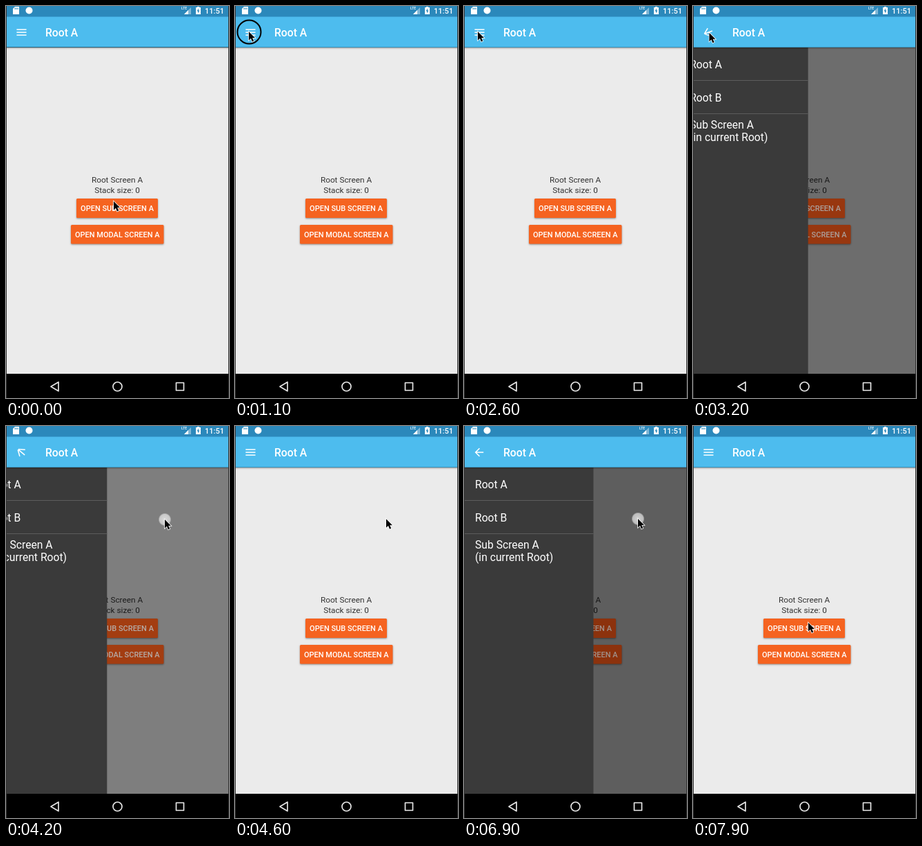
Recreate the animation shown at these times as an HTML page with a canvas. Size 323 px wide and 566 px high, loop 8 s.

```html
<!DOCTYPE html>
<html lang="en">
<head>
<meta charset="utf-8">
<title>Navigation drawer</title>
<style>
  html, body { margin: 0; height: 100%; overflow: hidden; background: #000; }
  canvas { display: block; }
</style>
</head>
<body>
<canvas id="stage" width="323" height="566"></canvas>
<script>
const ctx = document.getElementById('stage').getContext('2d');
const W = 323, H = 566, LOOP = 8000, STEP = 100;
const DRAWER = 187.5, TOP = 60, NAV = 531, DP = 0.786;

const clamp = x => Math.max(0, Math.min(1, x));
const lerp = (a, b, k) => a + (b - a) * k;
const smooth = k => k * k * (3 - 2 * k);
const easeOut = k => 1 - (1 - k) * (1 - k);
const mix = (a, b, k) => `rgb(${a.map((v, i) => Math.round(lerp(v, b[i], k)))})`;

// Cursor waypoints: time, x, y
const route = [
  [200, 156, 282], [900, 20, 37], [3150, 20, 37], [3800, 230, 135],
  [4500, 230, 135], [5250, 3, 121], [5450, 3, 121], [5650, 64, 123],
  [5800, 171, 131], [6000, 252, 134], [7200, 252, 134], [7800, 167, 284]
];
// Mouse presses: from, to; the touch dot trails behind them
const presses = [[1000, 1150], [1700, 1850], [2750, 2900], [3970, 4120], [5450, 6100], [6680, 6830]];
const LAG = 150;
// Animated drawer moves: start, target
const slides = [[1220, 1], [1980, 0], [3000, 1], [4165, 0], [6960, 0]];

function cursorAt(t) {
  if (t <= route[0][0]) return route[0].slice(1);
  const i = route.findIndex(p => p[0] > t);
  if (i < 0) return route[route.length - 1].slice(1);
  const [t0, x0, y0] = route[i - 1], [t1, x1, y1] = route[i];
  const dragging = t0 >= 5450 && t1 <= 6000;
  const k = (t - t0) / (t1 - t0), e = dragging ? k : smooth(k);
  return [lerp(x0, x1, e), lerp(y0, y1, e)];
}

const pressed = t => presses.some(([a, b]) => t >= a && t < b);

function drawerAt(t) {
  if (t >= 5450 && t < 6960) {
    return { open: clamp((cursorAt(t - LAG)[0] - 35) / DRAWER), closing: false };
  }
  let open = 0, closing = false;
  for (const [start, target] of slides) {
    if (t < start) break;
    const k = easeOut(clamp((t - start) / 300));
    open = target ? k : 1 - k;
    closing = !target;
  }
  return { open, closing };
}

function rect(color, x, y, w, h) {
  ctx.fillStyle = color;
  ctx.fillRect(x, y, w, h);
}

function text(str, x, y, size, color, weight = 400, align = 'left') {
  ctx.font = `${weight} ${size}px Roboto, sans-serif`;
  ctx.textAlign = align;
  ctx.fillStyle = color;
  ctx.fillText(str, x, y);
}

function poly(points, closed = true) {
  ctx.beginPath();
  points.forEach(([x, y]) => ctx.lineTo(x, y));
  if (closed) ctx.closePath();
}

function circle(x, y, r) {
  ctx.beginPath();
  ctx.arc(x, y, r, 0, Math.PI * 2);
}

function button(label, x, y, w, h, dim) {
  ctx.save();
  ctx.shadowColor = 'rgba(0,0,0,.4)';
  ctx.shadowBlur = 2.5;
  ctx.shadowOffsetY = 1;
  ctx.fillStyle = mix([245, 99, 32], [140, 50, 13], dim);
  ctx.beginPath();
  ctx.roundRect(x, y, w, h, 1.5);
  ctx.fill();
  ctx.restore();
  text(label, x + w / 2, y + h / 2 + 4, 11, mix([255, 255, 255], [160, 146, 140], dim), 500, 'center');
}

function page(open) {
  rect('#ebebeb', 0, TOP, W, NAV - TOP);
  text('Root Screen A', 161, 254.5, 11.8, '#333', 400, 'center');
  text('Stack size: 0', 161, 270, 11.8, '#333', 400, 'center');
  rect(`rgba(0,0,0,${0.6 * open})`, 0, TOP, W, NAV - TOP);
  button('OPEN SUB SCREEN A', 102, 278, 118, 28, open);
  button('OPEN MODAL SCREEN A', 94, 316, 134.5, 27.5, open);
}

function drawer(open) {
  if (!open) return;
  ctx.save();
  ctx.translate((open - 1) * DRAWER, 0);
  rect('#3a3a3a', 0, TOP, DRAWER, NAV - TOP);
  rect('#5c5c5c', 0, 107, DRAWER, 1);
  rect('#5c5c5c', 0, 155, DRAWER, 1);
  [['Root A', 90], ['Root B', 138], ['Sub Screen A', 176.5], ['(in current Root)', 194.5]]
    .forEach(([label, y]) => text(label, 16, y, 15.7, '#fff'));
  ctx.restore();
}

// Three bars that turn into a back arrow
function menuIcon(open, closing) {
  const head = lerp(18, 11.3, open), shaft = lerp(18, 16, open);
  const bend = open * Math.PI / 4, cut = lerp(0, 0.7, open), off = lerp(5, -0.7, open);
  const w = head * Math.cos(bend), h = head * Math.sin(bend), edge = -shaft / 2;
  ctx.save();
  ctx.translate(22.5, 38);
  ctx.scale(DP, DP);
  ctx.rotate(lerp(-Math.PI, 0, open) * (closing ? -1 : 1));
  ctx.strokeStyle = '#fff';
  ctx.lineWidth = 2;
  ctx.beginPath();
  ctx.moveTo(edge + cut, 0);
  ctx.lineTo(edge + shaft - cut, 0);
  for (const s of [1, -1]) {
    ctx.moveTo(edge, off * s);
    ctx.lineTo(edge + w, (off + h) * s);
  }
  ctx.stroke();
  ctx.restore();
}

function bars(open, closing) {
  ctx.save();
  ctx.shadowColor = 'rgba(0,0,0,.35)';
  ctx.shadowBlur = 2;
  ctx.shadowOffsetY = 1;
  rect('#4dbcee', 0, 15, W, TOP - 15.5);
  ctx.restore();
  rect('#2b88bb', 0, 0, W, 15.5);
  menuIcon(open, closing);
  text('Root A', 57, 44, 15.7, '#fff', 500);

  // Status icons
  ctx.fillStyle = '#fff';
  poly([[13, 1], [19, 1], [19, 12], [10, 12], [10, 4]]);
  ctx.fill();
  for (let i = 0; i < 3; i++) rect('#2b88bb', 12.6 + i * 2, 2.5, 1, 2.5);
  ctx.fillStyle = '#fff';
  circle(33.5, 6.5, 5);
  ctx.fill();
  text('LTE', 254, 5, 5, '#fff', 500);
  ctx.fillStyle = 'rgba(255,255,255,.4)';
  poly([[268, 2], [268, 12], [258, 12]]);
  ctx.fill();
  ctx.fillStyle = '#fff';
  poly([[264, 6], [264, 12], [258, 12]]);
  ctx.fill();
  rect('#fff', 275, 2, 7, 10);
  rect('#fff', 277, 1, 3, 1);
  ctx.fillStyle = '#2b88bb';
  poly([[279, 3.5], [276.5, 7.5], [278, 7.5], [278, 10.5], [280.5, 6.5], [279, 6.5]]);
  ctx.fill();
  text('11:51', 316, 11, 11, '#fff', 500, 'right');

  // Navigation keys
  rect('#000', 0, NAV, W, H - NAV);
  ctx.strokeStyle = '#e6e6e6';
  ctx.lineWidth = 1.7;
  ctx.lineJoin = 'round';
  poly([[65, 549.5], [76, 543], [76, 556]]);
  ctx.stroke();
  circle(161.5, 549.5, 6.5);
  ctx.stroke();
  ctx.strokeRect(246.5, 544, 11, 11);

  rect('#333', 0, 0, 1, H);
  rect('#333', W - 1, 0, 1, H);
}

function touchDot(x, y) {
  const g = ctx.createRadialGradient(x, y, 0, x, y, 9.5);
  g.addColorStop(0, 'rgba(255,255,255,.72)');
  g.addColorStop(0.8, 'rgba(240,240,240,.65)');
  g.addColorStop(0.92, 'rgba(175,175,175,.55)');
  g.addColorStop(1, 'rgba(150,150,150,0)');
  ctx.fillStyle = g;
  circle(x, y, 9.5);
  ctx.fill();
}

function cursor(x, y, ring) {
  if (ring) {
    ctx.strokeStyle = '#000';
    ctx.lineWidth = 2;
    circle(x + 0.5, y + 0.5, 17);
    ctx.stroke();
  }
  poly([[0, 0], [0, 12.5], [3, 9.8], [5, 14.5], [7.2, 13.5], [5.2, 9], [9, 9]]
    .map(([dx, dy]) => [x + dx, y + dy]));
  ctx.lineJoin = 'miter';
  ctx.strokeStyle = '#fff';
  ctx.lineWidth = 1.5;
  ctx.stroke();
  ctx.fillStyle = '#000';
  ctx.fill();
}

function draw(now) {
  const t = Math.floor((now % LOOP) / STEP) * STEP;
  const { open, closing } = drawerAt(t);
  page(open);
  drawer(open);
  bars(open, closing);
  if (pressed(t - LAG)) touchDot(...cursorAt(t - LAG));
  cursor(...cursorAt(t), pressed(t));
}

let start;
function frame(now) {
  start ??= now;
  draw(now - start);
  requestAnimationFrame(frame);
}
requestAnimationFrame(frame);
</script>
</body>
</html>
```
